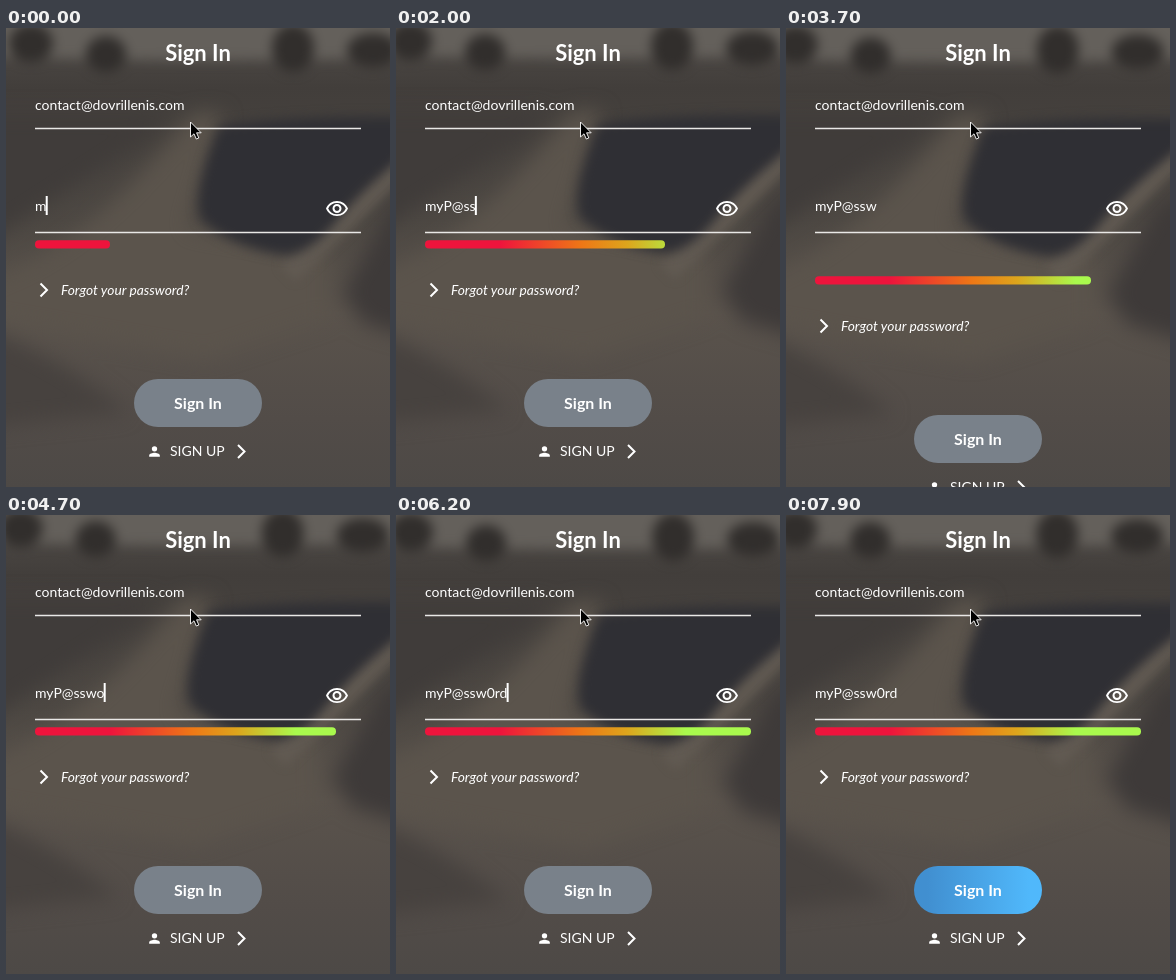
Animation of 384x459 px, one loop 8 s. Source, as an HTML page:

```html
<!DOCTYPE html>
<html lang="en">
<head>
<meta charset="utf-8">
<title>Sign In</title>
<style>
  html, body { margin: 0; width: 100%; height: 100%; overflow: hidden; background: #514b46; }
  svg { display: block; width: 100%; height: 100%; }
  text { font: 14px Lato, sans-serif; fill: #fff; }
  .title { font-size: 22px; font-weight: 700; }
  .btn { font-size: 16px; font-weight: 700; }
  .link { font-size: 13.8px; font-style: italic; }
  .mid { text-anchor: middle; }
  .line { fill: none; stroke: #fff; stroke-width: 2; }
  .soft { filter: blur(10px); }
</style>
</head>
<body>
<svg viewBox="0 0 384 459">
  <defs>
    <linearGradient id="ground" x2="0" y2="1">
      <stop offset="0" stop-color="#504c48"/>
      <stop offset=".13" stop-color="#423e3b"/>
      <stop offset=".42" stop-color="#4d4843"/>
      <stop offset=".62" stop-color="#5a534c"/>
      <stop offset=".85" stop-color="#524c48"/>
      <stop offset="1" stop-color="#4d4946"/>
    </linearGradient>
    <linearGradient id="strength" gradientUnits="userSpaceOnUse" x1="29" x2="355">
      <stop offset=".23" stop-color="#ee143c"/>
      <stop offset=".48" stop-color="#ee7716"/>
      <stop offset=".62" stop-color="#dda51c"/>
      <stop offset=".8" stop-color="#a9f94d"/>
    </linearGradient>
    <linearGradient id="active">
      <stop offset=".1" stop-color="#418fd0"/>
      <stop offset=".9" stop-color="#50b8fb"/>
    </linearGradient>
  </defs>

  <rect width="384" height="459" fill="url(#ground)"/>
  <g id="scene">
    <g class="soft">
      <path d="M-40 85H150L130 110L-40 220Z" fill="#403c3a"/>
      <path d="M-40 255C60 225 130 140 175 85H205L170 200L310 225V290L190 330L-40 290Z" fill="#5b544c"/>
      <path d="M-40 300C20 320 70 350 110 385L-40 400Z" fill="#47423f"/>
      <path d="M430 150L375 175L325 265L345 295L430 320Z" fill="#3e3a39"/>
    </g>
    <path d="M430 95L380 138L310 208L270 245" fill="none" stroke="#615a52" stroke-width="22" style="filter:blur(5px)"/>
    <path d="M202 98Q290 86 430 90V95Q350 150 315 197Q290 226 266 227Q215 220 184 192Q172 170 202 98Z"
          fill="#2f2f34" style="filter:blur(6px)"/>
    <g style="filter:blur(6px)">
      <path d="M-40 -20H430V28Q200 36 -40 28Z" fill="#64605b"/>
      <g fill="#312e2c">
        <ellipse cx="13" cy="15" rx="22" ry="19"/>
        <ellipse cx="88" cy="26" rx="20" ry="18"/>
        <ellipse cx="275" cy="20" rx="21" ry="24"/>
        <ellipse cx="355" cy="22" rx="26" ry="17"/>
      </g>
    </g>
  </g>

  <text class="title mid" x="192" y="32.7">Sign In</text>
  <text x="29" y="82">contact@dovrillenis.com</text>
  <path d="M29 100.5H355M29 204.5H355" stroke="#e9e8e6" stroke-width="1.3"/>
  <text id="password" x="29" y="183"></text>
  <rect id="caret" y="168" width="2" height="19" fill="#fff"/>
  <path transform="translate(319 169)" fill="#fff" d="M12 6a9.77 9.77 0 0 1 8.82 5.5 9.65 9.65 0 0 1-17.64 0A9.77 9.77 0 0 1 12 6m0-2C7 4 2.73 7.11 1 11.5 2.73 15.89 7 19 12 19s9.27-3.11 11-7.5C21.27 7.11 17 4 12 4m0 5a2.5 2.5 0 0 1 0 5 2.5 2.5 0 0 1 0-5m0-2a4.5 4.5 0 0 0 0 9 4.5 4.5 0 0 0 0-9"/>

  <g id="lower">
    <rect id="bar" x="29" y="212.3" height="8.2" rx="4" fill="url(#strength)"/>
    <path class="line" d="M34.5 255.5L41 262L34.5 268.5"/>
    <text class="link" x="55" y="267.3">Forgot your password?</text>
    <rect id="button" x="128" y="351" width="128" height="48" rx="24"/>
    <text class="btn mid" x="192" y="381">Sign In</text>
    <path transform="translate(140.5 415.5) scale(.667)" fill="#fff" d="M12 12a4 4 0 1 0 0-8 4 4 0 0 0 0 8zm0 2c-2.67 0-8 1.34-8 4v2h16v-2c0-2.66-5.33-4-8-4z"/>
    <text x="164" y="428">SIGN UP</text>
    <path class="line" d="M232 417L238.5 423.5L232 430"/>
  </g>
  <path d="M184.5 94V109L188 105.8L190.3 111L192.8 110L190.6 104.8H195.2Z" fill="#000" stroke="#fff" stroke-width=".9"/>
</svg>
<script>
  const LOOP = 8000;
  // time, field text, strength bar width
  const keys = [
    [0, "m", 75], [300, "my", 112], [600, "myP", 151], [1100, "myP@", 190],
    [1400, "myP@s", 215], [1700, "myP@ss", 240], [2750, "myP@ssw", 276],
    [4450, "myP@sswo", 301], [5000, "myP@ssw", 276], [5350, "myP@ssw0", 301],
    [5700, "myP@ssw0r", 326], [6000, "myP@ssw0rd", 326]
  ];
  const el = id => document.getElementById(id);
  const [scene, password, caret, lower, bar, button] =
    ["scene", "password", "caret", "lower", "bar", "button"].map(el);

  const ease = (t, start, length) => {
    const p = Math.min(1, Math.max(0, (t - start) / length));
    return p * p * (3 - 2 * p);
  };

  function draw(t) {
    const i = keys.findLastIndex(k => k[0] <= t);
    const [start, text, width] = keys[i];
    const from = i ? keys[i - 1][2] : width;
    password.textContent = text;
    caret.setAttribute("x", 28.2 + password.getComputedTextLength());
    caret.style.opacity = (t - start) % 1000 < 500 ? 1 : 0;
    bar.setAttribute("width", from + (width - from) * ease(t, start, 180));

    const drop = 36 * (ease(t, 3400, 200) - ease(t, 3900, 200));
    lower.setAttribute("transform", `translate(0 ${drop})`);
    button.setAttribute("fill", t < 7000 ? "#79818a" : "url(#active)");

    // Handheld drift, after a quick pan at the start
    const pan = 1 - ease(t, 0, 600);
    const x = 4 * Math.sin(t / 700) + 12 * pan;
    const y = 2 * Math.sin(t / 430);
    scene.setAttribute("transform", `translate(${x} ${y})`);
  }

  function tick() {
    draw(performance.now() % LOOP);
    requestAnimationFrame(tick);
  }
  tick();
</script>
</body>
</html>
```
